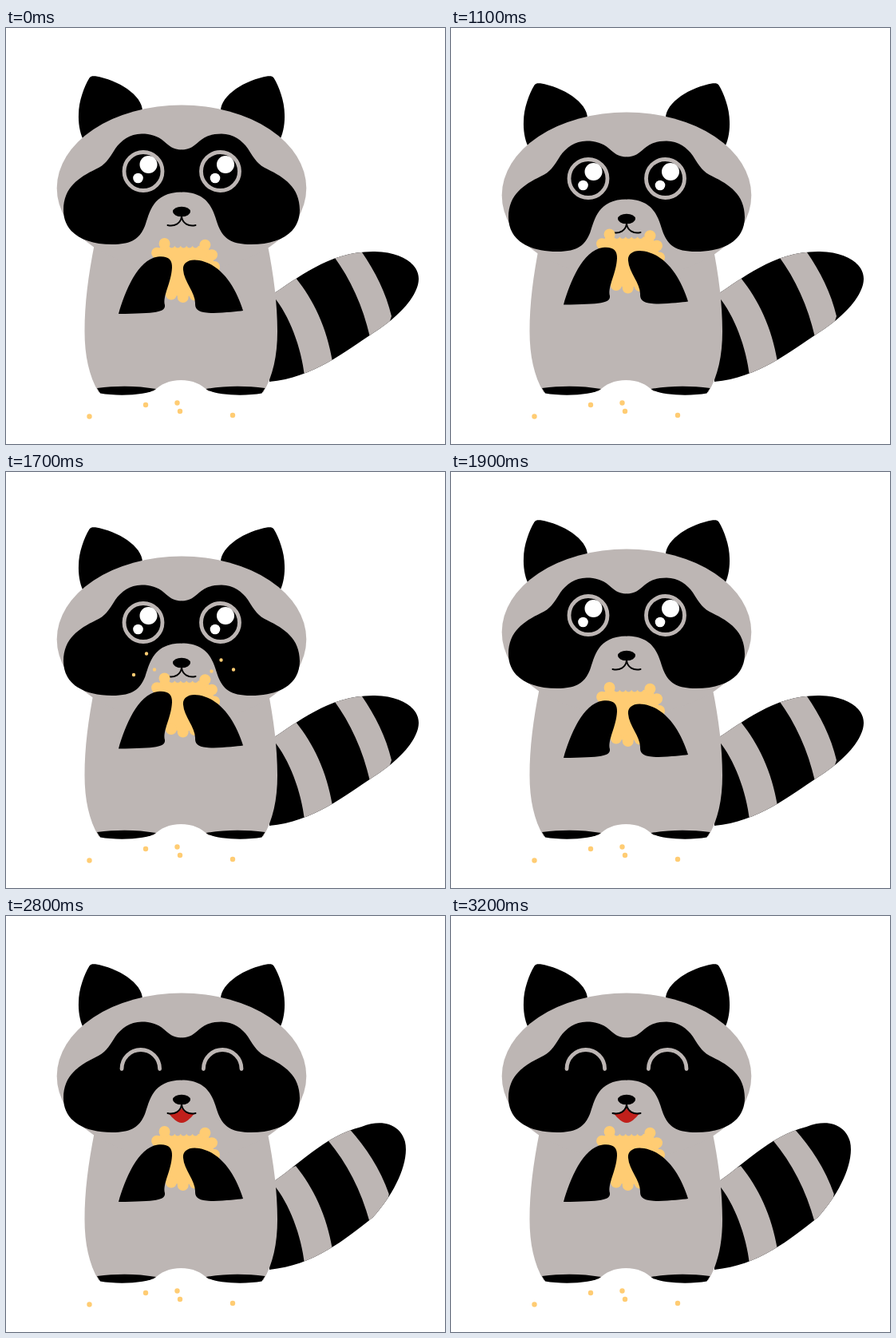
Recreate the animation shown at these times as an HTML page. Size 550x521 px, loop 3.3 s.

```html
<!DOCTYPE html>
<html lang="en">
<head>
<meta charset="utf-8">
<title>Snacking raccoon</title>
<style>
  html, body { margin: 0; width: 100%; height: 100%; overflow: hidden; background: #fff; }
  svg { display: block; width: 550px; height: 521px; }
  .fur { fill: #bdb6b4; }
  .rim { stroke: #bdb6b4; stroke-width: 4.8; }
  .dough { fill: #ffcc73; }
  .line, .crumbs { fill: none; stroke-linecap: round; }
  .crumbs { stroke: #ffcc73; }
</style>
</head>
<body>
<svg viewBox="0 0 550 521">
  <defs>
    <clipPath id="tailClip"><path id="tailEdge"/></clipPath>
    <g id="halfBody">
      <path class="fur" d="M111 270C103 310 98.500 345 98.500 380C98.500 410 104 436 116 456L185 455C194 446 204 441 220 441V270Z"/>
      <path d="M114 451C140 447.500 165 448 188 452C178 460 140 461.500 118 457.500Z"/>
    </g>
    <path id="ear" d="M97 140C92 131 90.500 117 91 108C91 92 98 73 104.500 62.500C106 60 109 60 112 60.300C140 65 171 84 171 104L130 140Z"/>
    <path id="mask" d="M220.500 152.500C209 152.500 204 147 198 142C190 135 181 132.500 170 132.500C155 132.500 144 141 137 151C128 165 125 171 112 177C92 187 72 199 72 228C72 255 95 271 133 271C160 271 168 262 174 248C180 232 183 205.500 220.500 205.500Z"/>
    <g id="eye">
      <circle class="rim" cx="172" cy="179.500" r="24"/>
      <g fill="#fff"><circle cx="178.500" cy="171" r="11"/><circle cx="165.500" cy="188" r="6.300"/></g>
    </g>
    <path id="shutEye" class="line rim" d="M145 191.500a23.800 24 0 0 1 47.600 0"/>
  </defs>

  <g clip-path="url(#tailClip)">
    <rect x="320" y="250" width="210" height="200"/>
    <path id="stripes" class="fur"/>
  </g>
  <use href="#halfBody"/>
  <use href="#halfBody" transform="matrix(-1 0 0 1 438.500 0)"/>

  <g id="head">
    <use href="#ear"/>
    <use href="#ear" transform="matrix(-1 0 0 1 440 0)"/>
    <ellipse class="fur" cx="220" cy="200.500" rx="156.300" ry="104"/>
    <use href="#mask"/>
    <use href="#mask" transform="matrix(-1 0 0 1 440 0)"/>
    <g id="openEyes"><use href="#eye"/><use href="#eye" x="96.500"/></g>
    <g id="shutEyes"><use href="#shutEye"/><use href="#shutEye" transform="matrix(-1 0 0 1 440 0)"/></g>
    <path id="mouth" fill="#c1201b"/>
    <path class="line" stroke="#000" stroke-width="2" d="M202.500 247C211 249 219 245 220 236C221 245 229 249 237.500 247"/>
    <ellipse cx="220" cy="230" rx="11" ry="6.300"/>
  </g>

  <g id="snack">
    <g class="dough"><path id="cookie"/><g id="bumps"></g></g>
    <path d="M141 358C149 330 165 290 190 286.500C203 285 208.500 290 208 300C207 320 196 335 199 347C200 356 188 357.500 141 358Z"/>
    <path d="M297 354C288 325 270 296 242 291C228 288.500 221 295 222 303C223 318 238 332 237 346C237 354 244 357 260 357C275 356.500 290 355 297 354Z"/>
  </g>

  <path id="faceCrumbs" class="crumbs" stroke-width="4.400" d="M176 227.500h0M160 254h0M186 247.500h0M257.500 249.500h0M269.500 235.500h0M285 247.500h0"/>
  <path class="crumbs" stroke-width="6.400" d="M104.500 486.500h0M175 472h0M214.500 469.500h0M218 480h0M284 485h0"/>
</svg>
<script>
  const el = id => document.getElementById(id);
  const set = (id, name, value) => el(id).setAttribute(name, value);
  const show = (id, on) => set(id, 'display', on ? 'inline' : 'none');
  const shift = (id, y) => set(id, 'transform', `translate(0 ${y})`);
  const rad = Math.PI / 180;

  // Round cookie with five bites along the top and bumps around the rest.
  set('cookie', 'd', `M204 273${'a4 4 0 0 0 7.4 0'.repeat(5)}L250 272A38 38 0 1 1 195 272Z`);
  for (let i = 0; i < 13; i++) {
    const a = (23 * i - 46) * rad;
    el('bumps').innerHTML += `<circle cx="${223 + 38 * Math.cos(a)}" cy="${299 + 38 * Math.sin(a)}" r="7"/>`;
  }

  const tailEdge = 'M330 336C365 314 405 279 462 280C500 281 517 298 517 314C517 336 490 363 460 382C425 405 385 438 330 443Z';
  const stripes = 'M325 330L363 313C385 340 402 375 409 418L374 436C370 400 355 360 335 336ZM410 285C432 315 447 348 456 387L475 385L483 361C476 331 462 304 444 278Z';

  // Rotates each point of a path about the tail's root, more towards the tip.
  function bend(path, lift) {
    return path.replace(/(\d+) (\d+)/g, (_, px, py) => {
      const x = px - 340, y = py - 390;
      const along = 0.82 * x - 0.57 * y;
      const a = -lift * Math.max(0, along - 82) * rad;
      const c = Math.cos(a), s = Math.sin(a);
      return `${(340 + x * c - y * s).toFixed(2)} ${(390 + x * s + y * c).toFixed(2)}`;
    });
  }

  function draw(t) {
    const step = Math.floor(t / 100);

    // Head and snack meet halfway, stay together for the chewing, then part.
    const bite = Math.max(0, Math.min(1, (step - 9) / 2, (19 - step) / 2));
    shift('head', 9 * bite);
    shift('snack', -8 * bite - 3.5 * Math.floor(bite));

    const chewing = step >= 12 && step < 18;
    const open = chewing ? 1 - step % 2 : Math.min(Math.max(step - 20, 0) / 3, 1);
    const low = 247.5 + 11.5 * open;
    set('mouth', 'd', `M204 247.5C212 248 218 245 220 240C222 245 228 248 236 247.5Q227 ${low} 220 ${low}Q213 ${low} 204 247.5Z`);
    show('mouth', open > 0);
    show('faceCrumbs', chewing);

    const smiling = step >= 22;
    show('openEyes', !smiling);
    show('shutEyes', smiling);

    const lift = step >= 28 && step % 2 === 0 ? 0.1 : 0;
    set('tailEdge', 'd', bend(tailEdge, lift));
    set('stripes', 'd', bend(stripes, lift));
  }

  const start = performance.now();
  function tick() {
    draw((performance.now() - start) % 3300);
    requestAnimationFrame(tick);
  }
  tick();
</script>
</body>
</html>
```
